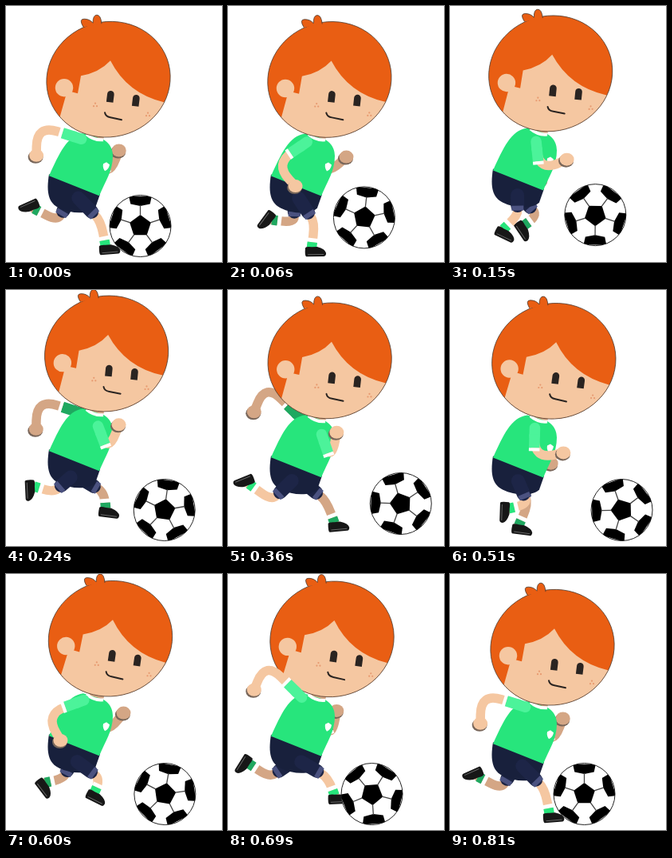
An HTML page with a canvas for the animation above (840 ms loop, 271x320 px).

```html
<!DOCTYPE html>
<html lang="en">
<head>
<meta charset="utf-8">
<title>Running with a ball</title>
<style>
html, body { margin: 0; width: 100%; height: 100%; overflow: hidden; background: #fff; }
canvas { display: block; }
</style>
</head>
<body>
<canvas id="stage" width="271" height="320"></canvas>
<script>
const ctx = document.getElementById('stage').getContext('2d');
const LOOP = 840, STEP = 30, CYCLE = 810, TURN = 2 * Math.PI, RAD = Math.PI / 180;
const HAIR = '#e95e13', SHIRT = '#27e57c', NAVY = '#18203c', DARK = '#2a2421', OUTLINE = '#4a3a30';
// The limbs of the far side run half a cycle behind the near ones.
const NEAR = { delay: 0, skin: '#f5c7a1', sleeve: '#4cf39a', sock: SHIRT, shorts: '#1d2547' };
const FAR = { delay: CYCLE / 2, skin: '#d4a685', sleeve: '#1fa860', sock: '#1fa860', shorts: '#1b2342' };

function shape(path, fill, stroke, width = .8) {
  const p = new Path2D(path);
  if (fill) { ctx.fillStyle = fill; ctx.fill(p); }
  if (stroke) { ctx.strokeStyle = stroke; ctx.lineWidth = width; ctx.stroke(p); }
}

function disc(x, y, rx, fill, ry = rx) {
  ctx.beginPath();
  ctx.ellipse(x, y, rx, ry, 0, 0, TURN);
  ctx.fillStyle = fill;
  ctx.fill();
}

function line(from, to, width, color, cap = 'butt') {
  ctx.beginPath();
  ctx.moveTo(...from);
  ctx.lineTo(...to);
  ctx.lineCap = cap;
  ctx.lineWidth = width;
  ctx.strokeStyle = color;
  ctx.stroke();
}

const distance = (a, b) => Math.hypot(b[0] - a[0], b[1] - a[1]);

// Point at a distance from a on the way to b.
function toward(a, b, dist) {
  const k = dist / (distance(a, b) || 1);
  return [a[0] + (b[0] - a[0]) * k, a[1] + (b[1] - a[1]) * k];
}

// Point below a, swung backwards by an angle in degrees.
const hang = ([x, y], length, angle) =>
  [x - length * Math.sin(angle * RAD), y + length * Math.cos(angle * RAD)];

// Tube whose joint is rounded over the given distance on both sides.
function limb(a, joint, b, bend, width, color) {
  ctx.beginPath();
  ctx.moveTo(...a);
  ctx.lineTo(...toward(joint, a, Math.min(bend, distance(a, joint))));
  ctx.quadraticCurveTo(...joint, ...toward(joint, b, Math.min(bend, distance(b, joint))));
  ctx.lineTo(...b);
  ctx.lineCap = 'round';
  ctx.lineWidth = width;
  ctx.strokeStyle = color;
  ctx.stroke();
}

// Swing s and its quarter-turn partner q drive every joint.
function swing(t, side) {
  const phase = TURN * (t + 83 + side.delay) / CYCLE;
  return [Math.cos(phase), Math.sin(phase)];
}

const bob = t => -5.5 - 6.5 * Math.cos(2 * TURN * (t - 235) / CYCLE);

function arm(t, side) {
  const [s] = swing(t, side);
  const shoulder = [105 - 13 * s, 174 - 10 * s + bob(t)];
  const elbow = hang(shoulder, 41 + 14 * s + 10 * s * s, 10 + 80 * s + 52 * s * s);
  const hand = hang(elbow, 38, -92 + 100 * s + 20 * s * s);
  const along = d => toward(shoulder, elbow, d);
  const [x, y] = hand;
  limb(along(12), elbow, hand, 27, 11.5, side.skin);
  disc(x - 1, y + 2, 9.5, '#78665a', 8);
  disc(x, y, 9, side.skin, 8);
  line(shoulder, along(10), 13.5, side.sleeve, 'round');
  line(along(8), along(25), 13.5, side.sleeve);
  line(along(25), along(29), 13.5, '#fff');
}

function leg(t, side) {
  const [s, q] = swing(t, side);
  const hip = [86 + 6 * s, 240 + bob(t) / 2];
  const knee = [88 + 37 * s - 4 * q + 10 * q * q, 258 + 8 * q * q + 16 * s * q];
  const ankle = [80 + 56 * s, 260 + 23 * s + 8 * q + 22 * q * q + 18 * s * q];
  const angle = 70 - 75 * s - 34 * q - 24 * q * q + 30 * s * q;
  const hem = distance(hip, knee) * .75;
  const thigh = d => toward(hip, knee, d), shin = d => toward(ankle, knee, d);
  limb(thigh(hem), knee, ankle, 16, 11.5, side.skin);
  line(hip, thigh(hem - 6), 17, side.shorts, 'round');
  line(thigh(hem - 6), thigh(hem), 15, '#4b5280');
  line(shin(7), shin(12), 12.5, '#fff');
  line(ankle, shin(7), 12.5, side.sock);
  ctx.save();
  ctx.translate(...ankle);
  ctx.rotate(angle * RAD);
  shape('M-8 0Q-7-2 0-1L7-1Q17 2 18 7Q18 11 15 11H-7Q-9 10-8 0Z', '#171717');
  line([-5, 8.5], [15, 8.5], 1, '#666');
  ctx.restore();
}

function shorts() {
  shape('M107 150L125 156L121 170L104 164Z', FAR.skin);
  shape('M54 210C50 234 54 246 66 252C82 260 104 260 112 252L118 235Z', NAVY);
}

function shirt() {
  shape('M97 159C76 162 67 184 54 212L117 237C125 218 134 206 134 187C134 173 124 167 120 166Z', SHIRT);
  shape('M101 160Q110 168 122 167', null, '#fff', 4);
  shape('M122 197L126 195L130 198Q129 204 124 206Q121 202 122 197Z', '#fff');
}

function eye(x, y) {
  ctx.save();
  ctx.translate(x, y);
  ctx.rotate(.12);
  shape('M-4.3 7V-3A4.3 4.3 0 0 1 4.3-3V7Z', DARK);
  ctx.restore();
}

function head() {
  const skull = new Path2D();
  skull.ellipse(128.5, 91.5, 78, 72, -14 * RAD, 0, TURN);
  ctx.save();
  ctx.clip(skull);
  ctx.fillStyle = HAIR;
  ctx.fillRect(40, 10, 180, 160);
  shape('M66 144L75 112L82 107L90 109L94 87Q117 83 131 68Q152 109 198 120L215 115V180H60Z', NEAR.skin);
  ctx.restore();
  ctx.lineWidth = .8;
  ctx.strokeStyle = OUTLINE;
  ctx.stroke(skull);
  shape('M97 26Q91 16 98 16Q105 16 109 21Q109 11 114 11Q119 11 120 22', HAIR, OUTLINE);
  disc(73, 102, 11.2, NEAR.skin);
  eye(131, 113);
  eye(163, 118);
  ctx.lineCap = 'round';
  shape('M124 133Q125 138 131 139L145 142', null, DARK, 2);
  for (const [x, y] of [[112, 123], [178, 135]])
    for (const [dx, dy] of [[0, -1.5], [-2, 2], [2, 2]]) disc(x + dx, y + dy, 1.1, '#e79a70');
}

function ball(t) {
  const R = 38.5, PEAK = 435;
  const roll = t < PEAK ? t / PEAK : (CYCLE - t) / (CYCLE - PEAK);
  const travel = 26 * (1 - Math.cos(Math.PI * roll));
  const height = t < 480 ? (t < 240 ? 15 : 8) * Math.sin(Math.PI * (t % 240) / 240) : 0;
  const polar = (r, deg) => [r * Math.cos(deg * RAD), r * Math.sin(deg * RAD)];
  const patch = points => shape('M' + points.map(p => polar(...p).join(' ')).join('L') + 'Z', '#000');
  ctx.save();
  ctx.translate(168.5 + travel, 275 - height);
  disc(0, 0, R, '#fff');
  ctx.beginPath();
  ctx.arc(0, 0, R, 0, TURN);
  ctx.lineWidth = 1;
  ctx.strokeStyle = '#222';
  ctx.stroke();
  ctx.clip();
  ctx.rotate(2.65 * travel * RAD);
  const corners = [0, 1, 2, 3, 4].map(i => 72 * i - 90);
  patch(corners.map(a => [14, a]));
  for (const a of corners) {
    patch([[25, a], [30, a + 24], [40, a + 21], [40, a - 21], [30, a - 24]]);
    line(polar(13, a), polar(26, a), 1.3, '#444');
  }
  ctx.restore();
}

function shifted(x, y, turn, paint) {
  ctx.save();
  ctx.translate(128 + x, 91 + y);
  ctx.rotate(turn * RAD);
  ctx.translate(-128, -91);
  paint();
  ctx.restore();
}

function draw(t) {
  const dx = -2.5 * Math.sin(TURN * t / CYCLE), dy = bob(t);
  ctx.fillStyle = '#fff';
  ctx.fillRect(0, 0, 271, 320);
  arm(t, FAR);
  leg(t, FAR);
  shifted(0, dy * .9, 0, shorts);
  leg(t, NEAR);
  shifted(0, dy * .9, 0, shirt);
  shifted(dx, dy, dx / 2, head);
  arm(t, NEAR);
  ball(t);
}

const start = performance.now();
function tick() {
  const time = (performance.now() - start) % LOOP;
  draw(Math.floor(time / STEP) * STEP % CYCLE);
  requestAnimationFrame(tick);
}
tick();
</script>
</body>
</html>
```
